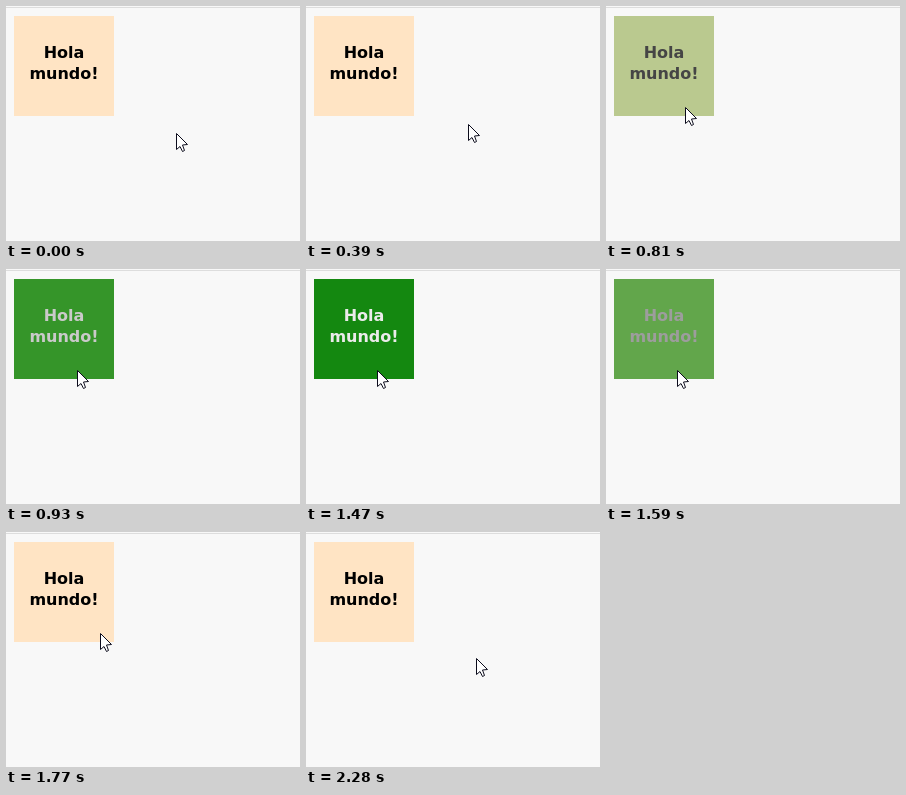
An HTML page with a canvas for the animation above (2.31 s loop, 294x235 px).

```html
<!DOCTYPE html>
<html lang="es">
<head>
<meta charset="utf-8">
<style>
html, body { margin: 0; width: 294px; height: 235px; overflow: hidden; background: #f8f8f8; }
.rule { position: absolute; top: 1px; left: 0; width: 294px; height: 1px; background: #ddd; }
#box {
  position: absolute; left: 8px; top: 10px; width: 100px; height: 74px; padding-top: 26px;
  font: bold 16px/21px "DejaVu Sans", Verdana, sans-serif; text-align: center;
  background: #ffe4c4; color: #000;
}
canvas { position: absolute; left: 0; top: 0; }
</style>
</head>
<body>
<div class="rule"></div>
<div id="box">Hola<br>mundo!</div>
<canvas id="stage" width="294" height="235"></canvas>
<script>
const LOOP = 2310, STEP = 30, TURN = 1470;
const box = document.getElementById('box');
const ctx = document.getElementById('stage').getContext('2d');
const arrow = new Path2D('M0 0V16L3.5 13L6 18L8 17L6 11.5L11 11Z');

const clamp = v => Math.min(1, Math.max(0, v));
const rgb = (a, b, k) => `rgb(${a.map((v, i) => Math.round(v + (b[i] - v) * k)).join(',')})`;

// CSS "ease": cubic-bezier(.25, .1, .25, 1)
function ease(x) {
  const curve = (p, q, s) => 3 * p * s * (1 - s) ** 2 + 3 * q * s * s * (1 - s) + s ** 3;
  let lo = 0, hi = 1;
  for (let i = 0; i < 20; i++) {
    const mid = (lo + hi) / 2;
    if (curve(.25, .25, mid) < x) lo = mid; else hi = mid;
  }
  return curve(.1, 1, lo);
}

// The pointer speeds up to the corner of the box, then glides along its lower edge.
function pointerAt(t) {
  const approach = clamp((t - 120) / 540) ** 3;
  const glide = 1 - (1 - clamp((t - 660) / 240)) ** 1.5;
  const x = 170.45 - 64.45 * approach - 35 * glide;
  const y = 101 + 25.2 * Math.max(0, (x - 106) / 64) ** 3;
  return [Math.round(x), Math.round(y)];
}

function drawPointer([x, y]) {
  ctx.clearRect(0, 0, 294, 235);
  ctx.save();
  ctx.translate(x + .5, y + .5);
  ctx.fillStyle = '#fff';
  ctx.fill(arrow);
  ctx.strokeStyle = '#0c0c1c';
  ctx.stroke(arrow);
  ctx.restore();
}

function frame(now) {
  const t = Math.floor(now % LOOP / STEP) * STEP;
  const back = t >= TURN;
  const k = ease(clamp((back ? 1733 - t : t - 734) / 400));
  box.style.background = rgb([255, 228, 196], [0, 128, 0], k);
  box.style.color = rgb([0, 0, 0], [255, 255, 255], k);
  drawPointer(pointerAt(back ? 2490 - t : t));
}

const start = performance.now();
function tick() {
  frame(performance.now() - start);
  requestAnimationFrame(tick);
}
tick();
</script>
</body>
</html>
```
